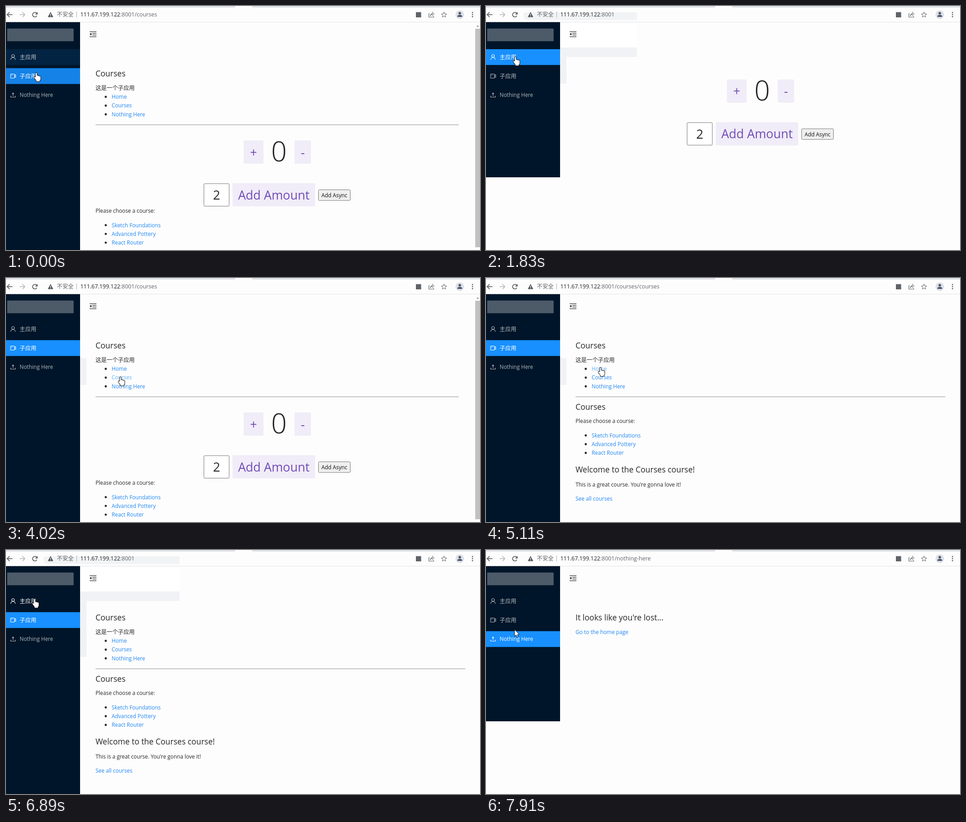
An HTML page with a canvas for the animation above (8 s loop, 1043 by 537 pixels).

```html
<!DOCTYPE html>
<html lang="zh">
<head>
<meta charset="utf-8">
<title>Micro app demo</title>
<style>
html, body { margin: 0; width: 100%; height: 100%; overflow: hidden; background: #fdfdfd; }
canvas { display: block; width: 1043px; height: 537px; }
</style>
</head>
<body>
<canvas id="stage"></canvas>
<script>
const W = 1043, H = 537, LOOP = 8000, STEP = 120;
const canvas = document.getElementById('stage');
const c = canvas.getContext('2d');
const dpr = window.devicePixelRatio || 1;
canvas.width = W * dpr;
canvas.height = H * dpr;

const FONT = '"Open Sans", "Noto Sans CJK SC", "Noto Sans CJK", "Noto Sans", sans-serif';
const INK = '#262626', LINK = '#1f86f5', LINK_HOVER = '#62b0fa', GREY = '#5f6368';
const PURPLE = '#704cb6', SOFT = '#f0ecf8', BAND = '#f0f2f5';
const BODY = 11.8, TITLE = 17.5, CJK = 12.3;
const SIDE = 163, ITEM = 34.8, PITCH = 41.8, ROW = 19.25;

const menu = ['主应用', '子应用', 'Nothing Here'];
const navLinks = ['Home', 'Courses', 'Nothing Here'];
const courses = ['Sketch Foundations', 'Advanced Pottery', 'React Router'];
const menuRow = { root: 0, home: 1, course: 1, lost: 2 };

// [start, view, path]
const visits = [
  [-300, 'root', ''], [-120, 'home', '/courses'], [1560, 'root', ''], [3030, 'home', '/courses'],
  [4170, 'course', '/courses/courses'], [5230, 'home', '/courses'],
  [5900, 'course', '/courses/courses'], [6890, 'course', ''],
  [7040, 'root', ''], [7670, 'lost', '/nothing-here']
];
// Pointer trips: [start, end, x, y]
const trips = [
  [0, 1, 67, 147], [850, 1320, 65, 112], [2060, 2380, 65, 163], [2400, 2760, 65, 148],
  [3040, 3510, 406, 282], [3540, 4020, 252, 218], [4400, 4670, 284, 234],
  [4700, 5110, 252, 197], [5380, 5620, 252, 221], [6020, 6890, 63, 108],
  [7160, 7400, 64, 186], [7790, 7910, 63, 175]
];

const itemTop = i => 95 + i * PITCH;
const linkY = i => 200 + i * ROW;
const between = (v, a, b) => v >= a && v < b;

function pointerAt(t) {
  let x = trips[0][2], y = trips[0][3];
  for (const [start, end, tx, ty] of trips) {
    const p = Math.min(1, Math.max(0, (t - start) / (end - start)));
    const k = p * p * (3 - 2 * p);
    x += (tx - x) * k;
    y += (ty - y) * k;
  }
  return [x, y];
}

function rect(x, y, w, h, fill) {
  c.fillStyle = fill;
  c.fillRect(x, y, w, h);
}

function roundBox(x, y, w, h, r, fill, line) {
  c.beginPath();
  c.roundRect(x, y, w, h, r);
  if (fill) { c.fillStyle = fill; c.fill(); }
  if (line) { c.strokeStyle = line; c.lineWidth = 1; c.stroke(); }
}

function setFont(size, weight = 400) {
  c.font = `${weight} ${size}px ${FONT}`;
}

// y is the middle of the capital letters
function text(s, x, y, color = INK, size = BODY, weight = 400, align = 'left') {
  setFont(size, weight);
  c.textAlign = align;
  c.fillStyle = color;
  c.fillText(s, x, y + size * 0.36);
}

function line(color, width, ...points) {
  c.strokeStyle = color;
  c.lineWidth = width;
  c.beginPath();
  for (let i = 0; i < points.length; i += 2) c.lineTo(points[i], points[i + 1]);
  c.stroke();
}

function arc(x, y, r, from, to, color, width) {
  c.beginPath();
  c.arc(x, y, r, from, to);
  c.strokeStyle = color;
  c.lineWidth = width;
  c.stroke();
}

function shape(points, fill, stroke) {
  c.beginPath();
  for (let i = 0; i < points.length; i += 2) c.lineTo(points[i], points[i + 1]);
  c.closePath();
  c.fillStyle = fill;
  c.fill();
  if (stroke) { c.strokeStyle = stroke; c.lineWidth = 1; c.stroke(); }
}

function dot(x, y, r, fill) {
  c.beginPath();
  c.arc(x, y, r, 0, 7);
  c.fillStyle = fill;
  c.fill();
}

function chevron(x, y, dx, dy, color, width) {
  line(color, width, x + dx, y - 5.5, x, y, x + dy, y + 5.5);
}

function drawStar(x, y) {
  const points = [];
  for (let i = 0; i < 10; i++) {
    const r = i % 2 ? 2.7 : 6.2, a = i * Math.PI / 5 - Math.PI / 2;
    points.push(x + r * Math.cos(a), y + r * Math.sin(a));
  }
  shape(points, '#fdfdfd', GREY);
}

function drawToolbar(path, pillEnd) {
  const mid = 19, dark = '#505357', pale = '#b5b7ba';
  rect(0, 0, W, 36, '#fdfdfd');
  roundBox(-10, -8, 515, 11.5, 4, '#dee1e6');
  roundBox(541, -8, 520, 11.5, 4, '#dee1e6');
  rect(0, 35, W, 1, '#e3e4e6');
  if (pillEnd) roundBox(83, 14, pillEnd - 83, 17, [3, 0, 0, 9], '#f1f3f4');

  line(dark, 1.6, 14, mid, 2.5, mid);
  chevron(2.5, mid, 5.5, 5.5, dark, 1.6);
  line(pale, 1.6, 30, mid, 41, mid);
  chevron(41.5, mid, -5.5, -5.5, pale, 1.6);
  arc(63.5, mid, 5, 0.5, 5.5, dark, 1.7);
  shape([69.5, 13, 69.5, 18.5, 64, 18.5], dark);
  shape([98, 13, 104, 24.5, 92, 24.5], dark);
  rect(97.3, 17, 1.5, 3.5, '#fff');
  rect(97.3, 21.5, 1.5, 1.5, '#fff');

  text('不安全', 112, mid, GREY, CJK);
  rect(155, 12, 1, 14, '#a9acb0');
  const host = '111.67.199.122';
  text(host, 163.5, mid, '#202124', 12.4);
  text(':8001' + path, 163.5 + c.measureText(host).width, mid, GREY, 12.4);

  rect(902, 13.5, 11.5, 11.5, GREY);
  line(GREY, 1.2, 932, 17, 930.5, 17, 930.5, 24.5, 941, 24.5, 941, 22);
  arc(939, 23, 5.5, 3.3, 4.6, GREY, 1.4);
  shape([938, 13.5, 942.5, 17.5, 938, 21], '#fdfdfd', GREY);
  drawStar(964, 19.5);
  dot(998.5, mid, 9.5, '#dfe1e5');
  dot(998.5, 16, 2.8, '#48546a');
  roundBox(993.2, 19.8, 10.6, 4.2, [4, 4, 0, 0], '#48546a');
  for (const d of [-4.5, 0, 4.5]) dot(1026.5, mid + d, 1.4, GREY);
}

const icons = [
  (x, y, color) => {
    arc(x, y - 2.4, 3, 0, 7, color, 1.1);
    arc(x, y + 5.8, 5, Math.PI, 0, color, 1.1);
  },
  (x, y, color) => {
    roundBox(x - 5.5, y - 4.5, 8.5, 9, 0, null, color);
    line(color, 1.1, x + 3, y - 1.5, x + 5.8, y - 2.8, x + 5.8, y + 2.8, x + 3, y + 1.5);
    line(color, 1.1, x - 4, y - 2, x - 1.5, y - 2);
  },
  (x, y, color) => {
    line(color, 1.1, x - 5.2, y + 1.5, x - 5.2, y + 4.5, x + 5.2, y + 4.5, x + 5.2, y + 1.5);
    line(color, 1.1, x, y + 2, x, y - 4.5);
    line(color, 1.1, x - 2.2, y - 2.3, x, y - 4.7, x + 2.2, y - 2.3);
  }
];

function drawSidebar(height, from, to, age, hover) {
  rect(0, 35.5, SIDE, height, '#001529');
  rect(2.6, 49.6, 146.2, 27.9, '#4d5b69');
  const left = Math.max(0, 1 - (Math.floor(age / STEP) * STEP + 60) / 270);
  const mix = 1 - left * left;
  menu.forEach((label, i) => {
    const on = (i === to ? mix : 0) + (i === from ? 1 - mix : 0);
    const y = itemTop(i) + ITEM / 2;
    if (on) rect(0, itemTop(i), SIDE, ITEM, `rgba(24,144,255,${on})`);
    const color = `rgba(255,255,255,${i === hover ? 1 : 0.7 + 0.3 * on})`;
    icons[i](15.5, y, color);
    text(label, 30, y, color, i < 2 ? CJK : BODY);
  });
}

function drawFold() {
  for (let i = 0; i < 4; i++) {
    const x = i % 3 ? 190 : 184;
    rect(x, 56 + i * 3.67, 199 - x, 1.2, INK);
  }
  shape([184, 62, 188, 59, 188, 65], INK);
}

function bullet(label, y, color) {
  dot(219.5, y, 2.4, INK);
  text(label, 232.5, y, color);
}

function title(s, y) {
  text(s, 197, y, INK, TITLE, 500);
}

function drawNav(hover, right) {
  title('Courses', 148.5);
  text('这是一个子应用', 197, 181, INK, CJK);
  navLinks.forEach((label, i) => bullet(label, linkY(i), i === hover ? LINK_HOVER : LINK));
  rect(197, 261, right - 197, 1, '#8f8f8f');
}

function button(label, x, y, w, h, size, ink, fill, border) {
  roundBox(x, y, w, h, 2, fill, border);
  text(label, x + w / 2, y + h / 2 + 0.5, ink, size, 400, 'center');
}

function drawCounter(dx, dy) {
  c.save();
  c.translate(dx, dy);
  button('+', 523, 296, 43.5, 51, 26.8, PURPLE, SOFT);
  button('-', 635, 296, 36, 51, 26.8, PURPLE, SOFT);
  text('0', 600.5, 320.5, INK, 60, 300, 'center');
  button('2', 435.5, 391, 55.5, 49.5, 27.5, INK, '#fff', '#767676');
  button('Add Amount', 498.5, 390, 181.5, 51, 26.8, PURPLE, SOFT);
  button('Add Async', 687.5, 404.5, 70, 23.5, BODY, '#111', '#efefef', '#767676');
  c.restore();
}

function drawCourses(y) {
  text('Please choose a course:', 197, y);
  courses.forEach((name, i) => bullet(name, y + 31.3 + i * ROW, LINK));
}

const pages = {
  home(hover) {
    drawNav(hover, 996);
    drawCounter(0, 0);
    drawCourses(451);
    rect(1032.5, 50, 10.5, 481, '#c1c1c1');
    shape([1038, 42, 1041, 46, 1035, 46], '#a3a3a3');
  },
  root() {
    drawCounter(7, -134.3);
  },
  course(hover) {
    drawNav(hover, 1010.5);
    title('Courses', 283.5);
    drawCourses(315.2);
    title('Welcome to the Courses course!', 422);
    text("This is a great course. You're gonna love it!", 197, 454.5);
    text('See all courses', 197, 486, LINK);
  },
  lost() {
    title("It looks like you're lost...", 148.5);
    text('Go to the home page', 197, 181, LINK);
  }
};

// Partly repainted layout: header, grey band and left strip
function drawRepaint(right, bottom) {
  rect(SIDE, 36, right - SIDE, 55.5, '#fff');
  rect(SIDE, 91.5, right - SIDE, 20.5, BAND);
  rect(SIDE, 112, 14, bottom - 112, BAND);
}

function drawHand() {
  c.beginPath();
  for (let i = 0; i < 4; i++) {
    const top = i ? 5.2 + i * 0.8 : 0;
    c.roundRect(-1.5 + i * 2.6, top, 2.6, 14 - top, 1.3);
  }
  c.roundRect(-1.5, 9, 10.4, 8, 3);
  c.rect(0, 15, 7, 4);
  c.moveTo(-3, 10);
  c.ellipse(-2, 12, 1.5, 4, -0.6, 0, 7);
  c.strokeStyle = '#111';
  c.lineWidth = 2;
  c.stroke();
  c.fillStyle = '#fff';
  c.fill();
}

function drawPointer(x, y, hand) {
  c.save();
  c.translate(x, y);
  c.lineJoin = 'round';
  if (hand) drawHand();
  else shape([0, 0, 0, 15, 3.4, 12, 5.6, 17, 8, 16, 5.8, 11.2, 10.2, 11], '#fff', '#111');
  c.restore();
}

function draw(t) {
  const now = visits.findLastIndex(v => v[0] <= t);
  const [start, view, path] = visits[now];
  const from = menuRow[visits[now - 1][1]], to = menuRow[view];
  const [x, y] = pointerAt(t);
  const hasNav = to === 1;
  const row = menu.findIndex((_, i) => x < SIDE && between(y, itemTop(i), itemTop(i) + ITEM));
  setFont(BODY);
  const link = navLinks.findIndex((s, i) => hasNav && Math.abs(y - linkY(i)) < ROW / 2 &&
    between(x, 232, 233 + c.measureText(s).width));
  const early = between(t, 1560, 3030), late = between(t, 6890, 7670);

  c.setTransform(dpr, 0, 0, dpr, 0, 0);
  rect(0, 0, W, H, '#fdfdfd');
  if (early) drawRepaint(332, 171);
  if (late) drawRepaint(382, 235);
  if (between(t, 3390, 6890)) rect(SIDE, 176, 14, 59, '#f2f2f6');
  drawToolbar(path, early ? 332 : late ? 382 : 0);
  drawSidebar(hasNav ? 502 : 341.5, from, to, t - start, row);
  drawFold();
  pages[view](link);
  drawPointer(x, y, row >= 0 || link >= 0);
}

function tick() {
  draw(performance.now() % LOOP);
  requestAnimationFrame(tick);
}
tick();
</script>
</body>
</html>
```
